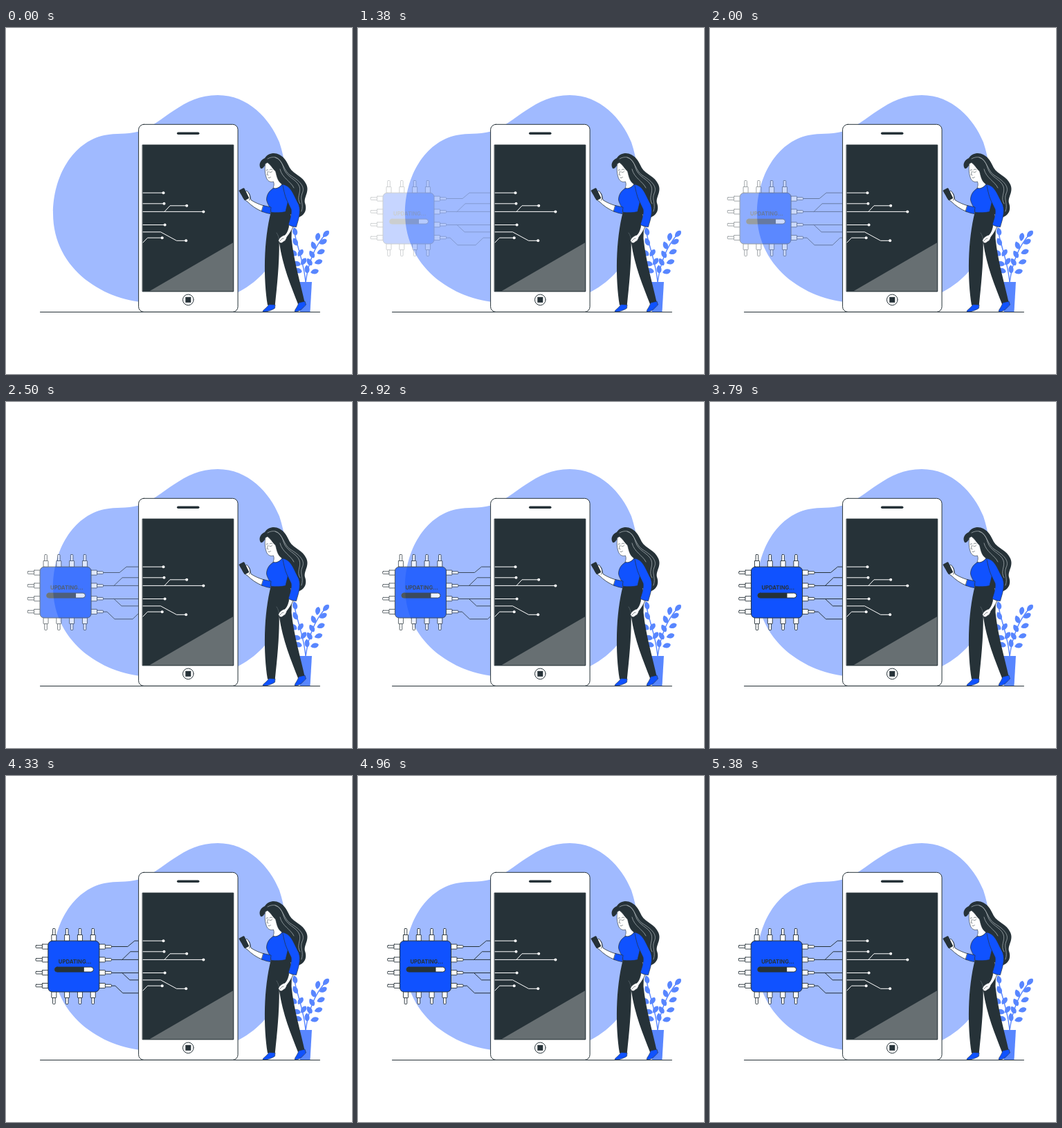
Write an HTML page with a canvas that moves like this. It is 500 px wide and 500 px high and loops after 5.43 s.

```html
<!DOCTYPE html>
<html lang="en">
<head>
<meta charset="utf-8">
<title>Updating</title>
<style>
html, body { margin: 0; width: 100%; height: 100%; overflow: hidden; background: #fff; }
canvas { display: block; width: 500px; height: 500px; }
</style>
</head>
<body>
<canvas id="stage" width="500" height="500"></canvas>
<script>
const INK = '#263238', BLUE = '#1052ff', LEAF = '#5886ff', PALE = '#a0baff', WHITE = '#fff';
const LOOP = 5430, FRAMES = 130, STEP = 1000 / 24, FIRST = 16;

const stage = document.getElementById('stage').getContext('2d');
const newLayer = () => {
  const c = document.createElement('canvas');
  c.width = c.height = 500;
  return c.getContext('2d');
};
const back = newLayer(), front = newLayer(), chip = newLayer();

function shape(c, d, fill, stroke, width = 1) {
  const p = new Path2D(d);
  if (fill) { c.fillStyle = fill; c.fill(p); }
  if (stroke) {
    c.strokeStyle = stroke;
    c.lineWidth = width;
    c.lineJoin = c.lineCap = 'round';
    c.stroke(p);
  }
}

function box(c, x, y, w, h, r, fill, stroke, width = 1) {
  c.beginPath();
  c.roundRect(x, y, w, h, r);
  if (fill) { c.fillStyle = fill; c.fill(); }
  if (stroke) { c.strokeStyle = stroke; c.lineWidth = width; c.stroke(); }
}

function dot(c, x, y, r, fill, stroke) {
  c.beginPath();
  c.arc(x, y, r, 0, Math.PI * 2);
  if (fill) { c.fillStyle = fill; c.fill(); }
  if (stroke) { c.strokeStyle = stroke; c.lineWidth = 1; c.stroke(); }
}

function leaf(c, x, y, deg) {
  c.save();
  c.translate(x, y);
  c.rotate(deg * Math.PI / 180);
  shape(c, 'M-6 0 C-3 -4.4 4 -5 6 0 C4 5 -3 4.4 -6 0Z', LEAF);
  c.restore();
}

function drawBack(c) {
  c.fillStyle = WHITE;
  c.fillRect(0, 0, 500, 500);
  shape(c, `M68 268 C68 215 96 165 142 155 C160 151.5 172 154.5 192 149.5
    C228 138 254 97 306 97 C350 97 381 131 395 165 C412 215 410 290 378 347
    C360 370 330 390 290 397 L210 397 C144 396 68 350 68 268Z`, PALE);
}

function drawPhone(c) {
  shape(c, 'M49.5 410.5 H453.5', null, INK);
  box(c, 191.6, 139.3, 143.5, 271, 7.5, WHITE, INK);
  box(c, 247, 150.4, 32.5, 3.7, 1.8, INK);
  box(c, 197.5, 169, 131.3, 211.8, 0.5, INK);
  shape(c, 'M328.5 310 V380.5 H207Z', '#676f72');
  shape(c, 'M197.5 169 H328.8 V380.8 H197.5Z', null, INK);
  dot(c, 263.3, 392.8, 7.8, WHITE, INK);
  box(c, 259.3, 388.8, 8, 8, 0.5, INK);

  shape(c, `M198 238.2 H227.5 M198 253.8 H228.5 M198 265.4 H285 M229 265.4 L237 256.8 H261
    M198 284.5 H229.5 M198 294.8 H223.5 L246.5 307.3 H260 M198 310 L204.5 303.2 H225.5`, null, WHITE);
  [[227.5, 238.2], [228.5, 253.8], [261.2, 256.8], [285.4, 265.4],
   [229.6, 284.5], [260.2, 307.3], [225.7, 303.2]].forEach(([x, y]) => dot(c, x, y, 2, WHITE));
}

function drawPlant(c) {
  shape(c, 'M433 368 C436 345 444 318 461 299 M433 368 C431 340 421 318 416 292', null, LEAF, 1.4);
  [[462.3, 297.5, -45], [450.5, 302, -80], [458.3, 309, -28], [444.3, 314, 68], [455, 323.5, -22],
   [442, 327, 60], [451.5, 338, -18], [438.5, 338, 58], [446, 352, -12], [435, 348.5, 85],
   [417.5, 294, 75], [418, 309, 65], [425.5, 325, -55], [415.5, 325, 40],
   [430, 337.5, -55], [420, 340.5, 15], [422, 350.5, 20]].forEach(a => leaf(c, ...a));
  shape(c, 'M420 367 H442 L439.5 410 H425Z', LEAF);
}

function drawWoman(c) {
  // hair
  shape(c, `M368 203 C364 196 369 190 374 188 C378 181 388 179 395 183 C403 187 406 194 410 202
    C416 212 429 214 434 226 C439 237 430 244 432 253 C436 264 430 272 422 273.5
    L403 266 L393 232 C390 222 388 212 384 204 L375 195.5 C374 200 371 204 368 203Z`, INK);
  shape(c, `M378 189 C391 182 398 191 401 202 C405 216 420 218 424 229 C427 238 419 245 425 254
    M389 187 C401 191 401 207 411 213 C424 221 433 229 428 239 C424 248 431 254 427 265
    M396 204 C399 217 412 222 416 231`, null, '#a3abaf', 0.8);

  // trousers
  shape(c, `M383 265 L409 264 C414 274 413 291 412.5 304 C416 338 426 370 431.5 396 L422 399
    C412 373 400 345 394.8 310 C395 342 391.5 374 388.8 400 L378 400.5
    C372 362 372 308 383 265Z`, INK);
  shape(c, 'M394.5 309 C395 303 393 299 391 296', null, '#68747a', 0.6);

  // shoes
  shape(c, 'M380 399.5 L389 400 L388.5 405 C384 408 378 410.3 371.5 410 C369.5 408 376 406 380 399.5Z', BLUE, INK, 0.6);
  shape(c, 'M423 397 L432 395 L433.5 400 C429 404 426 410 417.5 410 C416 408 421 404 423 397Z', BLUE, INK, 0.6);

  // face and neck
  shape(c, `M375 196 C373.5 201 374 210 376 215.5 C377.5 221 382 223.5 386.5 222
    C388 226 387 229 385.5 232.5 C391 233 396 230 399 226 C392 221 391.5 214 389.5 207 C386 204 382 197 378 194.5Z`, WHITE, INK, 0.6);
  shape(c, `M376 205.5 L378.5 204.8 M381 205 C382.5 203.5 384 204 385 205
    M380.5 208 C382 209 383.5 208.5 384.5 207.5 M378.8 207 L377.2 212 L379 212.6
    M379 216.2 C380.5 217 381.5 216.5 382.5 215.5`, null, INK, 0.55);

  // reaching forearm, hand and handset
  shape(c, `M373 257 C366 255 359 252 354 248.5 C353 244 352 239 349 236 C346 234 346 238 347 240
    L342 240 C341 244 344 248 349 251 C355 257 362 262 371 265.5Z`, WHITE, INK, 0.8);
  shape(c, 'M337 234.5 L343 231.3 Q344 231 344.6 232 L351 245 Q351.3 246 350.3 246.6 L346 249 Q345 249.4 344.3 248.4 L336.8 235.8 Q336.4 235 337 234.5Z', INK);
  shape(c, 'M350 238 C354 241 353 246 351.5 249', null, INK, 0.7);

  // top
  shape(c, `M387 231.5 C391 233 396 230 399.5 225.5 C405 228 408 233 409 240
    C409 248 406 256 404 265.5 C398 267 390 267 383 266.5 C383 260 377 254 376.5 248
    C376.5 241 381 234 387 231.5Z`, BLUE, INK, 0.7);
  shape(c, 'M372 256.5 L383 259 L382 268.5 C378 268 373 266.5 369.5 265Z', BLUE, INK, 0.7);

  // lowered arm
  shape(c, `M409 284 C408 291 406 296 403 299 C399 300 395 303 393.5 307
    C395 311 398 312 400 309.5 C404 308 405 305 406 302 C410 297 413 292 415 287Z`, WHITE, INK, 0.8);
  shape(c, 'M396 308 C397 306 399 304 401 304', null, INK, 0.6);
  shape(c, `M400 226 C412 228 415 240 423 255 C427 266 422 278 419.5 287.5
    C415 287.5 411 286 408 284 C411 275 413 268 412 262 C408 253 404 247 402 237Z`, BLUE, INK, 0.7);
}

// Chip body spans x 59..133 at rest.
function drawChip(c, dx) {
  c.setTransform(1, 0, 0, 1, 0, 0);
  c.clearRect(0, 0, 500, 500);
  c.translate(59 + dx, 0);
  shape(c, `M92 246.5 H115 L125 238.2 H170 M92 265.4 H170 M107 265.4 L119 253.8 H170
    M92 284.5 H170 M107 284.5 L118 294.8 H170
    M92 303.2 H97 L108 313.7 H134 L145 303.2 H170`, null, INK);
  for (let i = 0; i < 4; i++) {
    const x = 8.5 + i * 18.8, y = 246.6 + i * 18.8;
    box(c, x - 1.8, 220.5, 3.6, 9.5, 0.8, WHITE, INK, 0.9);
    box(c, x - 1.8, 320, 3.6, 9.5, 0.8, WHITE, INK, 0.9);
    box(c, x - 3.5, 229.5, 7, 9, 0.5, WHITE, INK, 0.9);
    box(c, x - 3.5, 311.5, 7, 9, 0.5, WHITE, INK, 0.9);
    box(c, -17.8, y - 1.8, 9.5, 3.6, 0.8, WHITE, INK, 0.9);
    box(c, 82, y - 1.8, 9.5, 3.6, 0.8, WHITE, INK, 0.9);
    box(c, -8.5, y - 3.5, 9, 7, 0.5, WHITE, INK, 0.9);
    box(c, 73.5, y - 3.5, 9, 7, 0.5, WHITE, INK, 0.9);
  }
  box(c, 0, 238.2, 74, 73.8, 6, BLUE, INK);
  c.fillStyle = INK;
  c.font = '700 7.7px Inter, sans-serif';
  c.fillText('UPDATING...', 15, 271.4);
  box(c, 9.5, 276.1, 56, 7, 3.5, WHITE, INK);
  box(c, 9.5, 276.1, 42.5, 7, [3.5, 0, 0, 3.5], INK);
}

// cubic-bezier(.36, -.01, .5, 1.38)
function ease(x) {
  const curve = (a, b, s) => 3 * (1 - s) ** 2 * s * a + 3 * (1 - s) * s * s * b + s ** 3;
  let lo = 0, hi = 1;
  for (let i = 0; i < 24; i++) {
    const mid = (lo + hi) / 2;
    if (curve(0.36, 0.5, mid) < x) lo = mid; else hi = mid;
  }
  return curve(-0.01, 1.38, lo);
}

drawBack(back);
drawPhone(front);
drawPlant(front);
drawWoman(front);

let start = null, last = -1;
function tick(now) {
  if (start === null) start = now;
  const t = (now - start) % LOOP;
  const n = Math.min(FRAMES - 1, Math.floor((t + 2) / STEP));
  if (n !== last) {
    last = n;
    stage.drawImage(back.canvas, 0, 0);
    if (n >= FIRST) {
      const k = ease(n / FRAMES);
      drawChip(chip, 30 * (k - 1));
      stage.globalAlpha = Math.max(0, Math.min(1, k));
      stage.drawImage(chip.canvas, 0, 0);
      stage.globalAlpha = 1;
    }
    stage.drawImage(front.canvas, 0, 0);
  }
  requestAnimationFrame(tick);
}
requestAnimationFrame(tick);
</script>
</body>
</html>
```
